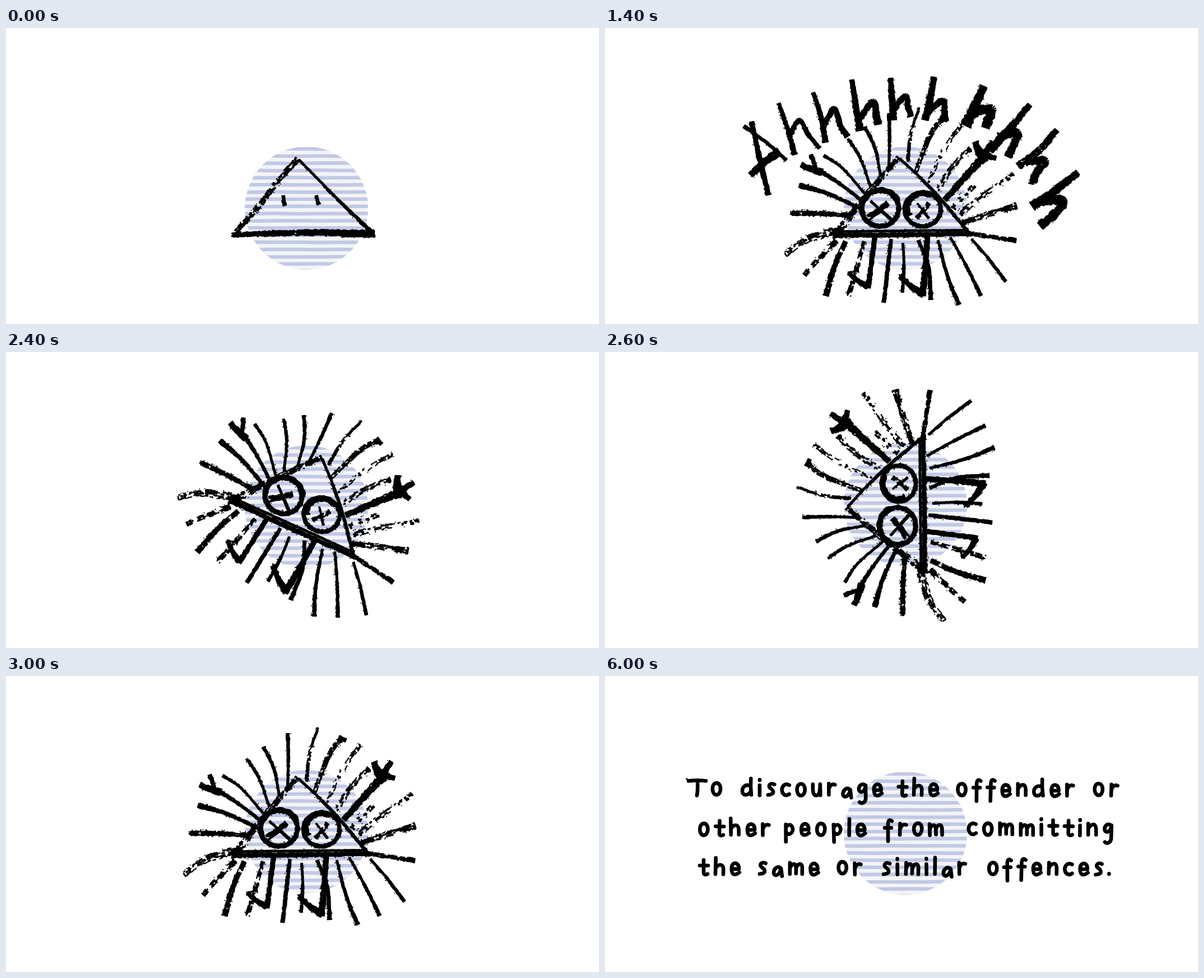
An HTML page with a canvas for the animation above (8 s loop, 1058 by 529 pixels).

```html
<!DOCTYPE html>
<html lang="en">
<head>
<meta charset="utf-8">
<title>Deterrence</title>
<style>
html, body { margin: 0; width: 100%; height: 100%; overflow: hidden; background: #fff; }
canvas { display: block; width: 1058px; height: 529px; }
</style>
</head>
<body>
<canvas id="stage" width="1058" height="529" role="img"
  aria-label="Deterrence: To discourage the offender or other people from committing the same or similar offences."></canvas>
<script>
const ctx = document.getElementById('stage').getContext('2d');
const LOOP = 8000, PIVOT = [524, 274], TAU = Math.PI * 2;

function hash(a, b) {
  const v = Math.sin(a * 127.1 + b * 311.7) * 43758.5453;
  return v - Math.floor(v);
}

function wave(x, seed) {
  const i = Math.floor(x), f = x - i, k = f * f * (3 - 2 * f);
  return hash(i, seed) * (1 - k) + hash(i + 1, seed) * k;
}

const spline = (a, b, c, d, u) =>
  b + u / 2 * (c - a + u * (2 * a - 5 * b + 4 * c - d + u * (3 * (b - c) + d - a)));

// Dry-brush stroke through points: many bristle marks, each with its own gaps.
function brush(pts, w0, w1 = w0, dry = 0, cut = 1) {
  const n = pts.length - 1, seed = Math.round(pts[0][0] + pts[0][1] * 3);
  let s = 0, px, py;
  for (let i = 0; i < n; i++) {
    const [b, c] = [pts[i], pts[i + 1]], a = pts[i - 1] || b, d = pts[i + 2] || c;
    const len = Math.hypot(c[0] - b[0], c[1] - b[1]), steps = Math.ceil(len / 1.4);
    for (let k = 0; k <= steps; k++) {
      const u = k / steps, part = (i + u) / n;
      if (part > cut) return;
      const x = spline(a[0], b[0], c[0], d[0], u), y = spline(a[1], b[1], c[1], d[1], u);
      const v = Math.min(1, u + 0.02), q = v - 0.04;
      const tx = spline(a[0], b[0], c[0], d[0], v) - spline(a[0], b[0], c[0], d[0], q);
      const ty = spline(a[1], b[1], c[1], d[1], v) - spline(a[1], b[1], c[1], d[1], q);
      const tl = Math.hypot(tx, ty) || 1, nx = -ty / tl, ny = tx / tl;
      if (px !== undefined) s += Math.hypot(x - px, y - py);
      px = x; py = y;
      const half = Math.max(0.4, (w0 + (w1 - w0) * part - 1.4) / 2);
      const left = half * (0.8 + 0.4 * wave(s / 3.5, seed + 1));
      const right = half * (0.8 + 0.4 * wave(s / 3.5, seed + 2));
      const band = wave(s / 5, seed + 3);
      for (let o = -left; o <= right; o += 1.4) {
        const lane = wave(s / 6, seed + 9 + Math.floor(o / 2));
        if (dry && lane * 0.6 + band * 0.4 < dry) continue;
        ctx.fillRect(x + nx * o - 1, y + ny * o - 1, 2.1, 2.1);
      }
      if (hash(s, seed) < 0.05 + dry * 0.15) {
        const o = (half + 2) * (hash(s, seed + 5) < 0.5 ? -1 : 1);
        ctx.fillRect(x + nx * o - 0.8, y + ny * o - 0.8, 1.7, 1.7);
      }
    }
  }
}

const ink = (path, ...rest) =>
  brush(path.split(' ').map(p => p.split(',').map(Number)), ...rest);

function ring(cx, cy, rx, ry, from, to, w0, w1) {
  const pts = [];
  for (let i = 0; i <= 14; i++) {
    const a = (from + (to - from) * i / 14) * TAU;
    pts.push([cx + rx * Math.cos(a), cy + ry * Math.sin(a)]);
  }
  brush(pts, w0, w1);
}

function disc(cy) {
  ctx.save();
  ctx.beginPath();
  ctx.arc(536, cy, 110, 0, TAU);
  ctx.clip();
  ctx.fillStyle = '#f4f4f6';
  ctx.fillRect(420, cy - 115, 232, 230);
  ctx.strokeStyle = '#c0c9e5';
  ctx.lineWidth = 6.3;
  for (let k = 0; k < 18; k++) {
    const y = cy - 106 + k * 12.85;
    ctx.beginPath();
    for (let x = 422; x <= 650; x += 12) ctx.lineTo(x, y + 0.9 * wave(x / 40, k) - 0.4);
    ctx.stroke();
  }
  ctx.restore();
}

function calmTriangle(eyes) {
  ink('411,364 450,320 490,268 521,235', 9, 11, 0.38);
  ink('523,236 590,305 655,368', 4, 8);
  ink('403,370 530,366 657,368', 9, 13, 0.12);
  ink('600,372 658,372', 5);
  if (!eyes) return;
  ink('494,300 495,309 497,317', 6, 8);
  ink('553,300 555,308 558,315', 6, 8);
}

function body() {
  ink('411,316 440,278 480,228 520,182', 13, 9, 0.38);
  ink('522,184 585,245 645,317', 5, 7);
  ink('405,314 530,313 640,312', 5);
  ink('405,321 530,320 649,318', 9, 8);
  ink('403,317 420,317', 17);
}

const rays = [
  ['448,271 395,246 343,231', 6, 10], ['458,244 420,200 387,178', 5, 6],
  ['470,233 452,183 430,148', 5, 6], ['488,212 478,165 460,127', 5, 7],
  ['503,195 504,150 503,103', 5, 7], ['536,188 543,135 557,93', 7, 4, 0.3],
  ['550,210 577,140 600,112', 8, 9, 0.42], ['572,225 603,165 632,123', 8, 7, 0.48],
  ['590,240 615,200 648,166', 9, 10, 0.5], ['620,274 634,252 655,232', 15, 9, 0.6],
  ['630,283 670,250 725,212', 11, 8, 0.5], ['635,298 690,280 730,268', 9, 12, 0.44],
  ['648,318 690,324 729,330', 7, 9, 0.32], ['650,328 682,365 710,403', 5, 7],
  ['612,325 640,375 666,428', 5, 7], ['590,330 607,395 627,444', 5, 8],
  ['555,330 572,375 577,435', 6, 8], ['527,335 529,380 526,422', 5, 6],
  ['506,328 500,380 493,440', 7, 8], ['458,332 443,385 430,428', 7, 9, 0.42],
  ['425,332 405,375 390,428', 9, 11, 0.22], ['408,330 375,365 352,391', 10, 9, 0.4],
  ['405,313 355,328 318,355', 15, 9, 0.44], ['430,284 375,281 327,281', 9, 9, 0.28]
];

function leftArm() {
  ink('450,255 415,228 378,204', 6, 8);
  ink('346,195 362,202 383,208', 10, 14);
  ink('363,177 368,190 372,207', 9, 8);
}

function rightArm() {
  ink('603,257 640,215 668,185', 10, 15, 0.1);
  ink('656,154 662,170 672,190', 12, 17);
  ink('687,153 672,176', 9, 14);
  ink('668,176 693,183', 14, 9);
}

function leftLeg() {
  ink('477,322 471,370 465,414', 9, 9);
  ink('465,412 448,402 431,388', 11, 8);
  ink('430,388 448,384', 4);
}

function rightLeg() {
  ink('571,322 567,380 562,428', 10, 12);
  ink('564,427 543,412 523,394', 12, 9);
  ink('523,394 530,388', 5);
}

function rings() {
  ring(487, 272, 33, 32, 0, 1.02, 9, 9);
  ring(488, 268, 31, 28, 0.55, 0.95, 9, 11);
  ring(563, 274, 32, 30, 0, 1.02, 8, 8);
  ring(562, 273, 28, 26, 0.42, 0.84, 14, 7);
}

function crosses() {
  ink('470,260 488,276 506,292', 5, 6);
  ink('500,263 484,276 466,288', 10, 11, 0.28);
  ink('553,264 564,278 573,290', 4, 5);
  ink('573,263 564,276 552,289', 8, 8, 0.32);
}

// The stage number tells how much of the creature is already drawn.
function creature(stage, dx, dy, angle = 0) {
  ctx.save();
  ctx.translate(PIVOT[0] + dx, PIVOT[1] + dy);
  ctx.rotate(angle * TAU / 360);
  ctx.translate(-PIVOT[0], -PIVOT[1]);
  [leftLeg, rightLeg, leftArm, rightArm, rings, crosses].forEach((part, i) => {
    if (stage >= i) part();
  });
  if (stage >= 4) body();
  const cut = Math.min(1, (stage - 5) / 3);
  if (cut > 0) {
    for (const [path, w0, w1, dry = 0] of rays) brush(
      path.split(' ').map(p => p.split(',').map(Number)), w0, w1, dry, cut);
    if (cut === 1) ink('594,110 606,115', 9, 7);
  }
  ctx.restore();
}

function scream() {
  ink('261,168 275,230 291,298', 9, 10);
  ink('248,176 290,207 323,236', 7, 6);
  ink('260,263 285,240 311,221', 11, 16, 0.1);
  ink('310,135 325,180 338,226', 7, 10);
  ink('329,196 346,165 362,190 382,215', 9, 8);
  ink('371,116 385,160 393,204', 8, 11);
  ink('388,182 408,145 420,175 432,194', 10, 11);
  ink('440,93 447,140 455,183', 9, 14);
  ink('455,162 478,132 483,152 487,172', 11, 13);
  ink('509,90 512,130 514,164', 10, 13);
  ink('513,150 535,122 540,140 545,158', 11, 11);
  ink('587,88 580,125 571,164', 11, 14);
  ink('577,150 602,130 605,150 607,166', 12, 11);
  ink('675,104 662,135 643,174', 14, 20);
  ink('656,152 688,145 684,163 679,178', 18, 15);
  ink('757,137 722,180 686,218', 10, 17);
  ink('702,195 735,188 727,213 719,230', 15, 14);
  ink('805,182 775,218 737,246', 11, 15, 0.14);
  ink('752,240 784,238 768,260 763,279', 14, 14, 0.14);
  ink('843,258 806,288 762,318', 12, 17);
  ink('778,310 817,308 802,332 776,353', 17, 16);
}

function headline() {
  ink('146,231 180,216 225,207', 8, 8, 0.46);
  ink('222,205 265,202 305,211 326,235 300,275 245,312 187,328', 6, 13, 0.16);
  ink('234,198 236,260 237,310', 4, 5);
  ink('304,292 345,291 380,279 372,259 345,252 322,278 317,308 338,328 373,316', 6, 10, 0.24);
  ink('446,192 434,235 425,285 427,323 445,306', 8, 6, 0.14);
  ink('384,260 420,251 463,246', 11, 10, 0.14);
  ink('455,289 490,279 508,259 495,246 472,262 461,300 478,321 504,310 524,283 535,240', 8, 8, 0.18);
  ink('537,238 533,280 530,313', 11, 13);
  ink('537,251 560,257 592,239', 7, 7, 0.1);
  ink('588,242 585,285 584,320', 10, 12);
  ink('592,249 618,276 642,274', 7, 8);
  ink('630,290 656,280 669,259 655,248 636,265 628,300 640,329 664,318 690,293 713,252', 9, 8, 0.22);
  ink('715,250 709,285 701,322', 11, 14);
  ink('702,320 733,266 754,239 763,270 776,307 801,320 832,294', 10, 7, 0.08);
  ink('853,238 838,270 832,306 850,327 880,312', 14, 11, 0.12);
  ink('868,291 904,275 916,254 900,245 878,263 867,300 884,325 918,319 930,308', 11, 9, 0.14);
  ink('926,314 947,296', 8, 4, 0.55);
}

// Hand lettering: width and pen path of each letter, baseline at 0.
const letters = {
  T: [34, 'M18 -31Q19 -15 17 -4M2 -30Q16 -32 33 -30'],
  o: [22, 'M11 -25C1 -25 2 -4 11 -4S21 -25 11 -25Z'],
  d: [24, 'M19 -33Q18 -18 20 -4M18 -20C8 -24 3 -16 4 -9S14 -2 19 -10'],
  i: [8, 'M4 -22V-4M4 -32v1'],
  s: [18, 'M15 -23C8 -27 2 -20 8 -16S17 -5 4 -4'],
  c: [20, 'M17 -22C8 -27 3 -18 4 -12S10 -1 17 -6'],
  u: [21, 'M4 -24C3 -8 5 -4 10 -4S17 -14 17 -24V-4'],
  r: [18, 'M4 -24V-4M4 -14C6 -21 10 -24 15 -22'],
  a: [22, 'M17 -14C10 -20 4 -12 4 -6S14 2 17 -14L19 0'],
  g: [20, 'M16 -22C8 -27 3 -20 4 -14S14 -8 16 -22V2C15 10 8 11 5 8'],
  e: [21, 'M4 -13H17C18 -26 4 -27 4 -14S10 -1 18 -7'],
  t: [20, 'M10 -30V-8C10 -3 14 -3 17 -5M3 -20H18'],
  h: [22, 'M4 -33V-4M4 -14C8 -22 17 -24 18 -14V-4'],
  f: [18, 'M15 -29C9 -34 8 -28 8 -22V7M2 -17H14'],
  n: [22, 'M4 -24V-4M4 -14C8 -24 18 -26 18 -14V-4'],
  p: [22, 'M5 -22L6 9M6 -18C14 -28 21 -14 16 -8S8 -6 6 -8'],
  l: [8, 'M4 -33V-4'],
  m: [30, 'M4 -24V-4M4 -14C8 -25 15 -24 15 -14V-5M15 -14C18 -25 27 -24 26 -14V-4'],
  '.': [6, 'M3 -4v.5']
};

const lines = [
  [217, { To: 147, discourage: 241, the: 520, offender: 626, or: 870 }],
  [288, { other: 165, people: 317, from: 497, committing: 645 }],
  [358, { the: 166, same: 272, or: 413, similar: 493, 'offences.': 681 }]
];

function sentence() {
  ctx.lineWidth = 6.6;
  ctx.lineCap = ctx.lineJoin = 'round';
  ctx.strokeStyle = '#000';
  for (const [y, words] of lines) {
    for (const [word, start] of Object.entries(words)) {
      let x = start;
      for (const ch of word) {
        const [w, d] = letters[ch];
        ctx.save();
        ctx.translate(x, y + hash(x, y) * 2 - 1);
        ctx.rotate((hash(y, x) - 0.5) * 0.06);
        ctx.stroke(new Path2D(d));
        ctx.restore();
        x += w + 6.9;
      }
    }
  }
  ink('145,184 155,190', 2, 2);
}

// start time, angle, shift x, shift y, disc centre
const spin = [
  [2100, -16, 0, -3, 281], [2200, -159, 22, 6, 280], [2400, -335, 4, 0, 277],
  [2600, -450, 0, 0, 273], [2800, -609, 4, -5, 276], [3000, -720, 0, 0, 278]
];

function draw(t) {
  ctx.fillStyle = '#fff';
  ctx.fillRect(0, 0, 1058, 529);
  const pose = spin.filter(p => p[0] <= t).pop();
  disc(t < 2100 ? 322 : t < 4000 ? pose[4] : 281);
  ctx.fillStyle = '#000';
  if (t < 2100) {
    const stage = Math.min(8, Math.floor((t - 500) / 100));
    if (stage < 4) calmTriangle(true);
    creature(stage, 4, 50);
    if (t >= 1400) scream();
  } else if (t < 4000) {
    creature(8, pose[2], pose[3], pose[1]);
  } else if (t < 6000) {
    headline();
  } else {
    sentence();
  }
}

const cues = [0];
for (let t = 500; t <= 1400; t += 100) cues.push(t);
cues.push(...spin.map(p => p[0]), 4000, 6000);

const begin = performance.now();
let shown = -1;
function tick() {
  const t = (performance.now() - begin) % LOOP;
  const cue = cues.filter(c => c <= t).pop();
  if (cue !== shown) draw(shown = cue);
  requestAnimationFrame(tick);
}
tick();
</script>
</body>
</html>
```
